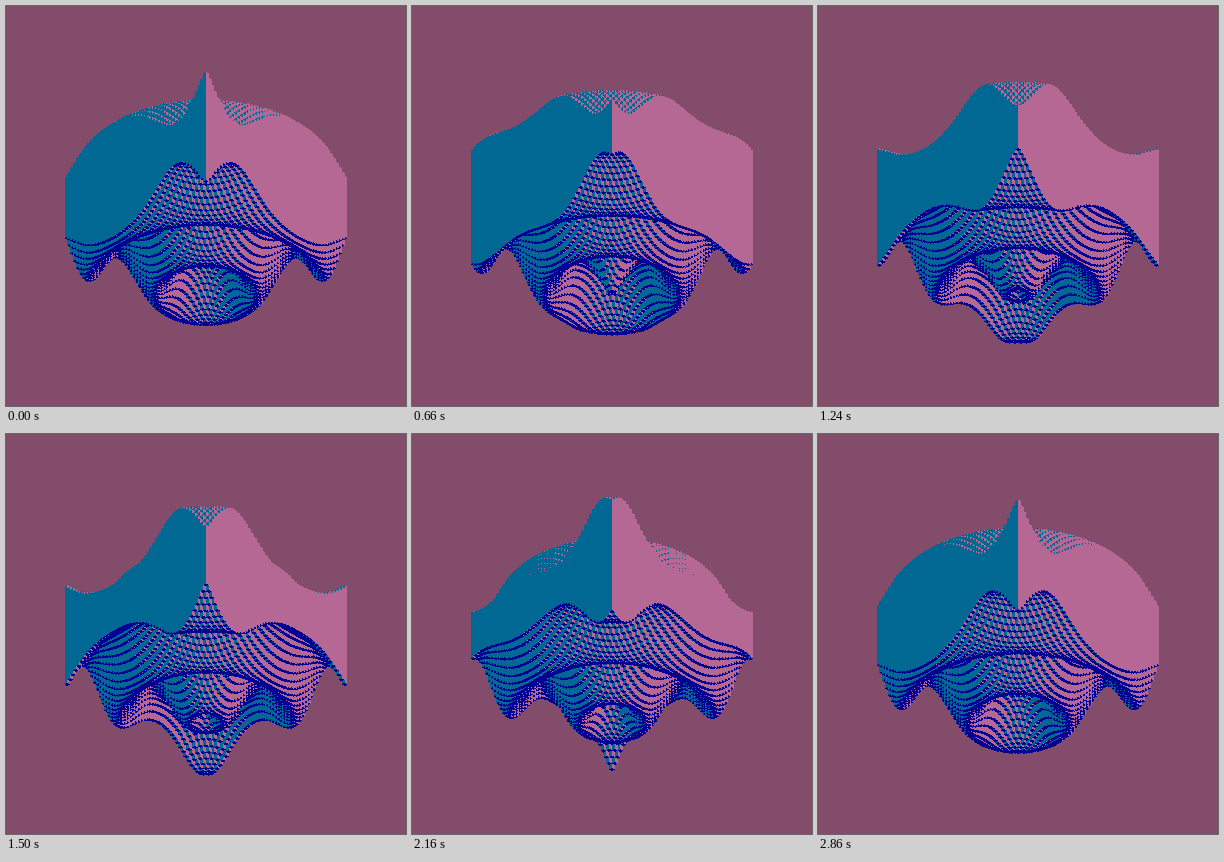
An HTML page with a canvas for the animation above (2880 ms loop, 400 by 400 pixels).

```html
<!DOCTYPE html>
<html>
<head>
<meta charset="utf-8">
<style>
html, body { margin: 0; height: 100%; overflow: hidden; background: #834c6a; }
canvas { display: block; }
</style>
</head>
<body>
<canvas id="stage" width="400" height="400"></canvas>
<script>
const SIZE = 400, MID = SIZE / 2;
const LOOP = 2880, STEP = 20;
const COUNT = 50, CELL = 4;              // boxes per side, box width in px
const HALF_W = CELL / Math.SQRT2;        // half diagonal of a cap on screen
const HALF_H = CELL / Math.sqrt(6);
const TILT = Math.sqrt(2 / 3);           // vertical foreshortening, isometric
const WAVE = 4 * Math.PI / (100 * Math.SQRT2);
const SOURCE = -100 / 3;                 // ripple origin on both grid axes
const START = -0.17;

const rgb = (r, g, b) => (255 << 24 | b << 16 | g << 8 | r) >>> 0;
const BACK = rgb(131, 76, 106);
const LEFT = rgb(0, 104, 147);
const RIGHT = rgb(180, 104, 147);
const CAP = rgb(0, 0, 147);

const ctx = document.getElementById('stage').getContext('2d');
const image = ctx.createImageData(SIZE, SIZE);
const pixels = new Uint32Array(image.data.buffer);

// Boxes from the farthest to the nearest, seen from below.
const boxes = [];
for (let i = 0; i < COUNT; i++) {
  for (let j = 0; j < COUNT; j++) {
    const u = i * CELL - 100, v = j * CELL - 100;
    boxes.push({
      x: MID + (u - v) / Math.SQRT2,
      y: MID - (u + v) / Math.sqrt(6),
      lag: WAVE * Math.hypot(u - SOURCE, v - SOURCE)
    });
  }
}

function column(x, top, bottom, color) {
  const end = Math.round(bottom);
  for (let y = Math.round(top); y < end; y++) pixels[y * SIZE + x] = color;
}

function drawBox(x, y, half) {
  const end = Math.round(x + HALF_W);
  for (let px = Math.round(x - HALF_W); px < end; px++) {
    const dx = px + 0.5 - x;
    const edge = HALF_H * (1 - Math.abs(dx) / HALF_W);
    column(px, y - edge - half, y - edge + half, dx < 0 ? LEFT : RIGHT);
    column(px, y - edge + half, y + edge + half, CAP);
  }
}

function draw(time) {
  const angle = START + 2 * Math.PI * time / LOOP;
  pixels.fill(BACK);
  for (const { x, y, lag } of boxes) {
    const height = Math.floor(200 + 100 * Math.sin(angle - lag));
    drawBox(x, y, height / 4 * TILT);
  }
  ctx.putImageData(image, 0, 0);
}

let last = -1;
function tick() {
  const time = Math.floor(performance.now() % LOOP / STEP) * STEP;
  if (time !== last) draw(last = time);
  requestAnimationFrame(tick);
}
tick();
</script>
</body>
</html>
```
